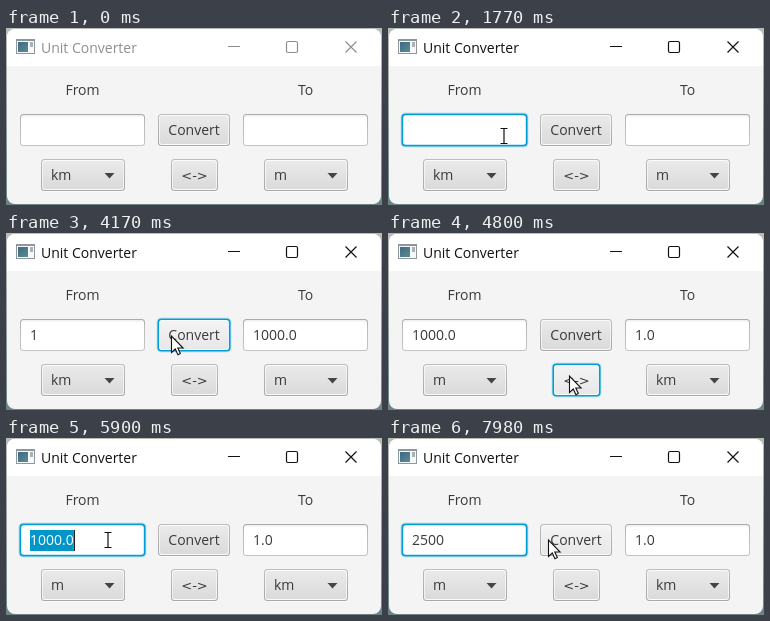
These frames come from a looping animation (376x177 px, 8000 ms). An HTML page with a canvas:

```html
<!DOCTYPE html>
<html lang="en">
<head>
<meta charset="utf-8">
<title>Unit Converter</title>
<style>
html, body { margin: 0; width: 376px; height: 177px; overflow: hidden; }
canvas { display: block; }
</style>
</head>
<body>
<canvas id="stage" width="376" height="177"></canvas>
<script>
const ctx = document.getElementById('stage').getContext('2d');
const LOOP = 8000, STEP = 70;
const SANS = '14px "Open Sans", "Noto Sans", sans-serif';
const INK = '#3c3a38', FOCUS = '#039ed3';

const FROM = { x: 14, y: 86, w: 125, h: 32 };
const TO = { x: 237, y: 86, w: 125, h: 32 };
const CONVERT = { x: 152, y: 86, w: 72, h: 32 };
const SWAP = { x: 165, y: 131, w: 47, h: 32 };
const UNIT_A = { x: 35, y: 131, w: 84, h: 32 };
const UNIT_B = { x: 258, y: 131, w: 84, h: 32 };

// Pointer moves: start, end, from x, y, to x, y
const MOVES = [
  [730, 1430, 160, 173, 119.5, 110],
  [1560, 1770, 119.5, 110, 116, 108],
  [2570, 2850, 116, 108, 162, 101],
  [4100, 4170, 162, 101, 165, 103],
  [4170, 4590, 165, 103, 181, 143],
  [5200, 5480, 181, 143, 102, 102],
  [7630, 7980, 102, 102, 160, 102]
];

// Text of the first field: time, text
const TYPED = [[0, ''], [2100, '1'], [4800, '1000.0'], [6570, '2'], [6840, '25'], [6970, '250'], [7170, '2500']];
const RESULTS = [[0, ''], [3050, '1000.0'], [4800, '1.0']];
const FOCUSED = [[0, null], [1560, FROM], [2920, CONVERT], [4660, SWAP], [5530, FROM]];
// Moments at which the caret starts a fresh blink
const BLINKS = [[0, 0], [1840, 1840], [2100, 2100], [5530, 5530], [6500, 6500], [6570, 6570],
  [6840, 6840], [6970, 6970], [7170, 7170]];

const at = (list, t) => list.filter(e => e[0] <= t).pop()[1];
const within = (t, a, b) => t >= a && t < b;
const inside = (p, r) => p && p.x >= r.x && p.x < r.x + r.w && p.y >= r.y && p.y < r.y + r.h;

function pointer(t) {
  const m = MOVES.filter(e => e[0] <= t).pop();
  if (!m) return null;
  const [a, b, x0, y0, x1, y1] = m;
  const k = Math.min(1, Math.floor((t - a) / STEP) * STEP / (b - a));
  const e = k * k * (3 - 2 * k);
  return { x: x0 + (x1 - x0) * e, y: y0 + (y1 - y0) * e };
}

function box(r, grow, radius, fill) {
  ctx.beginPath();
  ctx.roundRect(r.x - grow, r.y - grow, r.w + 2 * grow, r.h + 2 * grow, radius);
  ctx.fillStyle = fill;
  ctx.fill();
}

function shade(r, ...stops) {
  const g = ctx.createLinearGradient(0, r.y, 0, r.y + r.h);
  stops.forEach(([p, c]) => g.addColorStop(p, c));
  return g;
}

function text(s, x, y, color = INK, align = 'left', font = SANS) {
  ctx.font = font;
  ctx.textAlign = align;
  ctx.fillStyle = color;
  ctx.fillText(s, x, y);
}

function lines(color, width, ...paths) {
  ctx.strokeStyle = color;
  ctx.lineWidth = width;
  ctx.beginPath();
  for (const [x0, y0, x1, y1] of paths) {
    ctx.moveTo(x0, y0);
    ctx.lineTo(x1, y1);
  }
  ctx.stroke();
}

function polygon(points, x, y) {
  ctx.beginPath();
  points.forEach(([px, py]) => ctx.lineTo(x + px, y + py));
  ctx.closePath();
}

function focusRing(r) {
  box(r, 1.75, 5, 'rgba(3,158,211,0.13)');
  box(r, 0.6, 4, FOCUS);
}

function titleBar(active) {
  const c = active ? '#111' : '#8e8e8e';
  ctx.fillStyle = '#fff';
  ctx.fillRect(0, 0, 376, 38);

  ctx.fillStyle = '#8d979c';
  ctx.fillRect(10, 11, 19, 15);
  ctx.fillStyle = '#f6f8f9';
  ctx.fillRect(11, 13, 17, 12);
  const g = ctx.createLinearGradient(12, 13, 22, 25);
  g.addColorStop(0, '#3c6684');
  g.addColorStop(1, '#5b8f91');
  ctx.fillStyle = g;
  ctx.fillRect(12, 14, 10, 10);
  ctx.fillStyle = '#a9b2b6';
  ctx.fillRect(24, 14, 3, 5);

  text('Unit Converter', 35, 25, c);
  lines(c, 1.2, [222, 18.5, 234, 18.5], [339.5, 13.5, 350.5, 24.5], [350.5, 13.5, 339.5, 24.5]);
  ctx.beginPath();
  ctx.roundRect(280.5, 13.5, 11, 11, 1.5);
  ctx.stroke();
}

function field(r, value, opt = {}) {
  if (opt.focus) {
    focusRing(r);
    box(r, -1.2, 2.5, '#fff');
  } else {
    box(r, 0, 3.5, shade(r, [0, '#a9a9a9'], [0.3, '#bcbcbc'], [1, '#c4c4c4']));
    box(r, -1, 2.5, shade(r, [0, '#e6e6e6'], [0.12, '#fff'], [1, '#fff']));
  }
  const x = r.x + 10;
  ctx.font = SANS;
  ctx.textAlign = 'left';
  const w = ctx.measureText(value).width;
  if (opt.selected) {
    ctx.fillStyle = '#0096c9';
    ctx.fillRect(x, 92, w, 21);
  }
  text(value, x, 107, opt.selected ? '#fff' : INK);
  if (opt.caret) {
    ctx.fillStyle = '#222';
    ctx.fillRect(Math.round(x + w) - 0.2, 92, 1.2, 21);
  }
}

function buttonFace(r, opt = {}) {
  if (opt.focus) focusRing(r);
  else {
    box({ ...r, y: r.y + 1 }, 0, 4, '#fafafa');
    box(r, 0, 3.5, shade(r, [0, '#bdbdbd'], [1, '#a8a8a8']));
  }
  const [top, low] = opt.down ? ['#cfcfcf', '#d6d6d6'] : opt.hover ? ['#f4f4f4', '#e7e7e7'] : ['#ebebeb', '#d9d9d9'];
  box(r, -1.1, 2.5, opt.down ? top : '#fbfbfb');
  box(r, -2, 2, shade(r, [0, top], [1, low]));
}

function combo(r, unit) {
  buttonFace(r);
  text(unit, r.x + 10, 152);
  polygon([[0, 0], [10, 0], [5, 5.5]], r.x + 63.5, 145);
  ctx.fillStyle = '#454545';
  ctx.fill();
}

function drawPointer(p) {
  if (inside(p, FROM) || inside(p, TO)) {
    const { x, y } = p;
    const bars = [[x - 3.5, y - 7.5, x + 3.5, y - 7.5], [x, y - 7.5, x, y + 7.5], [x - 3.5, y + 7.5, x + 3.5, y + 7.5]];
    lines('#111', 1.2, ...bars);
    return;
  }
  polygon([[0, 0], [0, 16.5], [3.8, 13], [6.4, 18.7], [8.8, 17.6], [6.3, 12], [11.6, 12]], p.x + 0.5, p.y);
  ctx.fillStyle = '#fff';
  ctx.fill();
  ctx.strokeStyle = '#111';
  ctx.lineWidth = 1.1;
  ctx.lineJoin = 'miter';
  ctx.stroke();
}

function draw(t) {
  const p = pointer(t);
  const focus = at(FOCUSED, t);
  const swapped = t >= 4800;
  const caret = t >= 1840 && Math.floor((t - at(BLINKS, t)) / 500) % 2 === 0;

  const desk = ctx.createLinearGradient(0, 0, 0, 177);
  desk.addColorStop(0, '#b9bdb8');
  desk.addColorStop(1, '#6b8385');
  ctx.fillStyle = desk;
  ctx.fillRect(0, 0, 376, 177);

  ctx.save();
  ctx.beginPath();
  ctx.roundRect(1, 1, 374, 175, 8);
  ctx.clip();
  ctx.fillStyle = '#f4f4f4';
  ctx.fillRect(0, 0, 376, 177);
  titleBar(t >= 1560);
  ctx.restore();

  text('From', 76.5, 67, INK, 'center');
  text('To', 299.5, 67, INK, 'center');
  field(FROM, at(TYPED, t), {
    focus: focus === FROM,
    selected: within(t, 5690, 6570),
    caret: focus === FROM && caret
  });
  field(TO, at(RESULTS, t));
  buttonFace(CONVERT, { focus: focus === CONVERT, hover: inside(p, CONVERT), down: within(t, 2920, 3050) });
  text('Convert', 188, 107, INK, 'center');
  buttonFace(SWAP, { focus: focus === SWAP, hover: inside(p, SWAP), down: within(t, 4660, 4800) });
  text('<->', 188.5, 152, INK, 'center', '13px "DejaVu Sans", sans-serif');
  combo(UNIT_A, swapped ? 'm' : 'km');
  combo(UNIT_B, swapped ? 'km' : 'm');
  if (p) drawPointer(p);
}

const start = performance.now();
function tick() {
  draw((performance.now() - start) % LOOP);
  requestAnimationFrame(tick);
}
tick();
</script>
</body>
</html>
```
